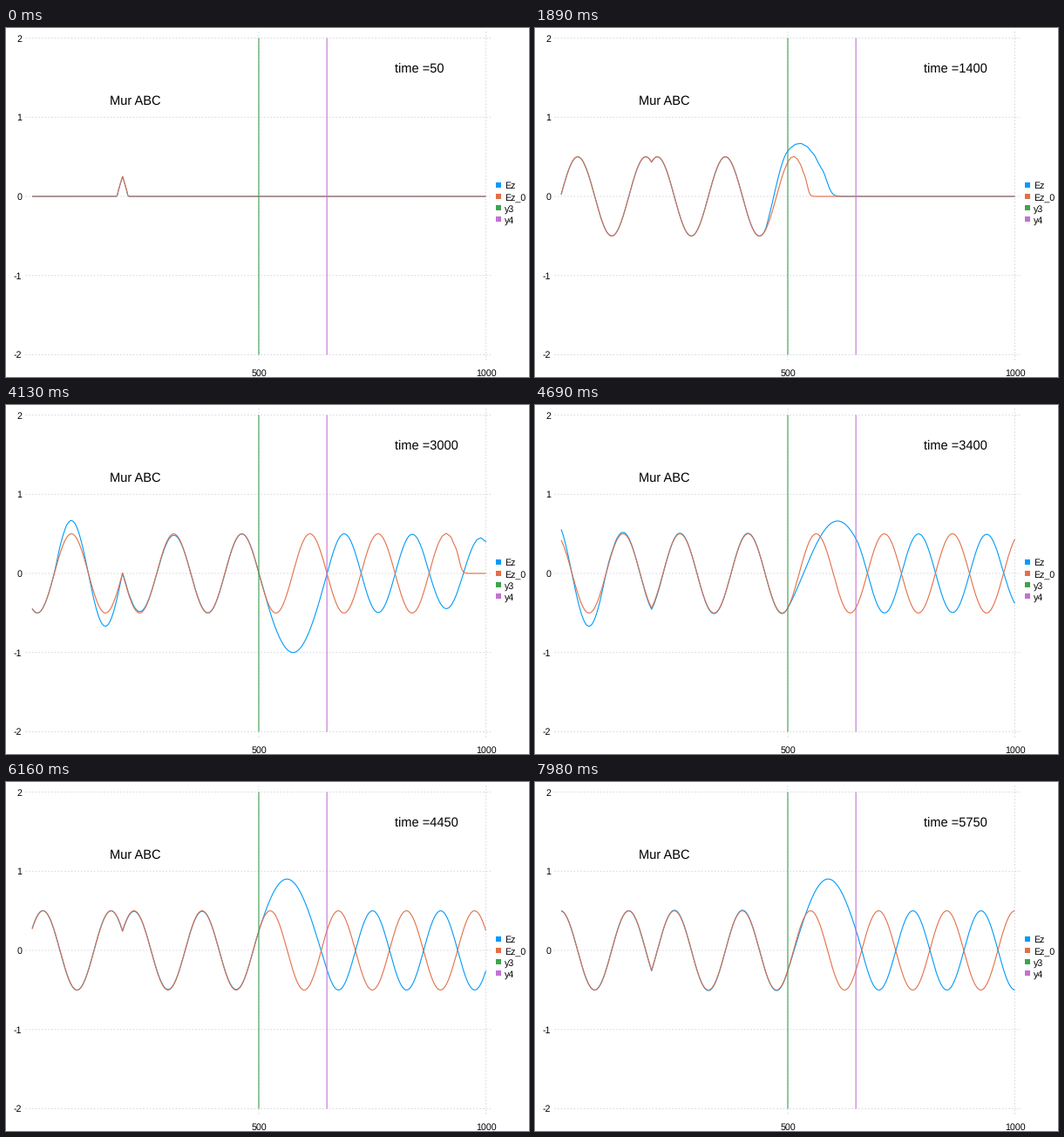
Animation of 600 by 400 pixels, one loop 8 s. Source, as a matplotlib script:

```python
import matplotlib.pyplot as plt
import numpy as np
from matplotlib.animation import FuncAnimation
from matplotlib.patches import Rectangle

W, H, DPI = 600, 400, 100
PX = 72 / DPI                      # points per pixel
BLUE, ORANGE, GREEN, PURPLE = "#009AFA", "#E36F47", "#3EA44E", "#C371D2"
GRID = "#D0D0E0"

CELLS, SOURCE = 1000, 200
SLAB, SLAB_EPS = (500, 650), 0.25
COURANT, PERIOD = 0.25, 600
STEPS, SHOTS = 50, 115             # time steps per picture, pictures per loop
TICK, HOLD, LOOP = 20, 70, 8000    # milliseconds

plt.rcParams["font.family"] = "Liberation Sans"
plt.rcParams["text.hinting"] = "none"


def simulate():
    """1D FDTD with Mur boundaries; row 0 has the slab, row 1 is free space."""
    eps = np.ones((2, CELLS))
    eps[0, SLAB[0] - 1:SLAB[1]] = SLAB_EPS
    gain = COURANT / eps[:, 1:-1]
    mur = (COURANT - 1) / (COURANT + 1)
    e = np.zeros((2, CELLS))
    h = np.zeros((2, CELLS - 1))
    shots = []
    for t in range(1, STEPS * SHOTS + 1):
        old = e[:, [0, 1, -2, -1]]
        h += COURANT * np.diff(e, axis=1)
        e[:, 1:-1] += gain * np.diff(h, axis=1)
        e[:, SOURCE - 1] += COURANT * np.sin(2 * np.pi * t / PERIOD)
        e[:, 0] = old[:, 1] + mur * (e[:, 1] - old[:, 0])
        e[:, -1] = old[:, 2] + mur * (e[:, -2] - old[:, 3])
        if t % STEPS == 0:
            shots.append(e.copy())
    return shots


def px(x):
    return 29.5 + 0.521 * x


def py(y):
    return 193 - 90.75 * y


fig = plt.figure(figsize=(W / DPI, H / DPI), dpi=DPI, facecolor="white")
ax = fig.add_axes([0, 0, 1, 1])
ax.set(xlim=(0, W), ylim=(H, 0))
ax.axis("off")


def line(xs, ys, color, width=1.1, **kw):
    return ax.plot(xs, ys, color=color, lw=width * PX, snap=False,
                   solid_capstyle="butt", **kw)[0]


def label(x, y, text, size=10.67, ha="left"):
    return ax.text(x, y, text, fontsize=size * PX, ha=ha, va="baseline",
                   color="black")


def grid(xs, ys):
    line(xs, ys, GRID, 0.75, dashes=(2.5, 2.5), dash_capstyle="butt")


for v in range(-2, 3):
    grid((22, 558), (py(v), py(v)))
    label(18.3, py(v) + 4, str(v), ha="right")
for v in (500, 1000):
    grid((px(v), px(v)), (4, 382))
    label(px(v) + 0.3, 399, str(v), ha="center")

xs = px(np.arange(1, CELLS + 1))
waves = [line(xs, xs * 0, c) for c in (BLUE, ORANGE)]
for edge, c in zip(SLAB, (GREEN, PURPLE)):
    line((px(edge), px(edge)), (py(2), py(-2)), c)

names = zip(("Ez", "Ez_0", "y3", "y4"), (BLUE, ORANGE, GREEN, PURPLE))
for i, (name, c) in enumerate(names):
    y = 180 + 13 * i
    ax.add_patch(Rectangle((562, y - 3.2), 6.4, 6.4, color=c, lw=0))
    label(572, y + 4.4, name)

label(119.3, 88, "Mur ABC", 14.67)
clock = label(446, 52, "", 14.67)

shots = simulate()


def draw(frame):
    n = min((frame * TICK + TICK // 2) // HOLD, SHOTS - 1)
    for wave, e in zip(waves, shots[n]):
        wave.set_ydata(py(e))
    clock.set_text(f"time ={STEPS * (n + 1)}")
    return [*waves, clock]


anim = FuncAnimation(fig, draw, frames=LOOP // TICK, interval=TICK,
                     repeat=True, repeat_delay=0)
plt.show()
```
